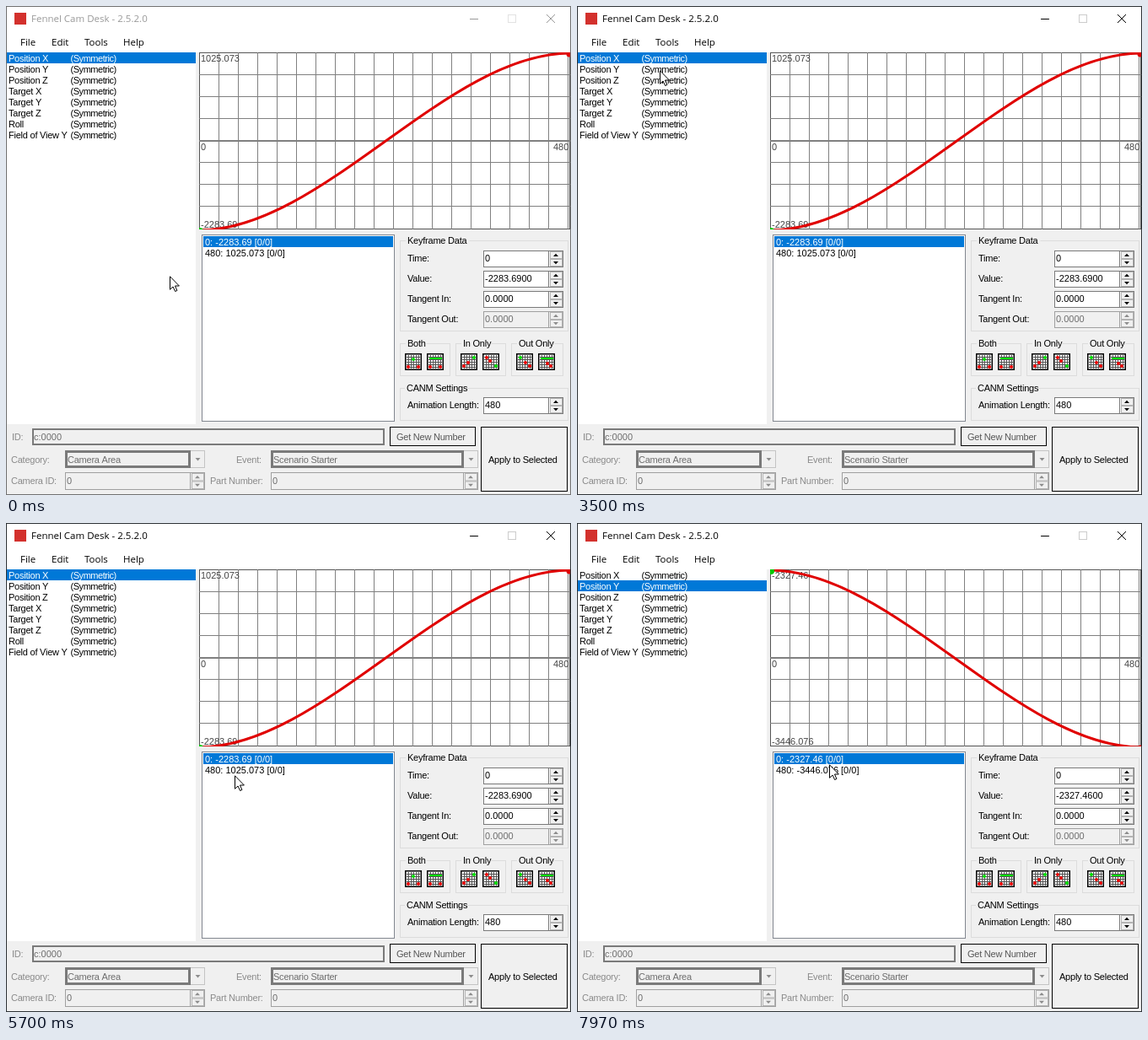
Recreate the animation shown at these times as an HTML page with a canvas. Size 670 by 580 pixels, loop 8000 ms.

```html
<!DOCTYPE html>
<html lang="en">
<head>
<meta charset="utf-8">
<title>Camera curve editor</title>
<style>
html, body { margin: 0; width: 100%; height: 100%; overflow: hidden; background: #f0f0f0; }
canvas { display: block; }
</style>
</head>
<body>
<canvas id="stage" width="670" height="580"></canvas>
<script>
const c = document.getElementById('stage').getContext('2d');
const FACE = '#f0f0f0', BLUE = '#0078d7', DIM = '#6d6d6d', FAINT = '#8a8a8a', GRID = '#808080';
const FORM = '11px "Liberation Sans", Arial, sans-serif';
const MENU = '11.5px "Open Sans", "Noto Sans", sans-serif';
const FPS = 30, FRAMES = 240;
const ROWS = ['Position X', 'Position Y', 'Position Z', 'Target X', 'Target Y', 'Target Z', 'Roll', 'Field of View Y'];
const CURVES = [
  { from: '-2283.69', to: '1025.073', rising: true },
  { from: '-2327.46', to: '-3446.076', rising: false }
];

const smooth = u => u * u * (3 - 2 * u);
const easeIn = u => u * u;
const easeOut = u => u * (2 - u);
const linear = u => u;

// Pointer moves: first frame, last frame, x, y, easing
const START = [194, 320];
const MOVES = [
  [25, 29, 194, 296, easeIn], [29, 50, 89, 72, easeOut],
  [58, 59, 89, 65, linear], [99, 100, 89, 68, linear],
  [103, 120, 316, 275, smooth], [120, 124, 337, 324, easeOut],
  [124, 128, 310, 296, smooth], [128, 133, 278, 279, easeOut],
  [154, 161, 278, 299, smooth], [170, 171, 271, 299, linear],
  [171, 183, 107, 76, smooth], [196, 200, 197, 117, easeIn],
  [200, 211, 281, 278, easeOut], [222, 229, 302, 289, smooth],
  [238, 239, 299, 286, linear]
];

function pointer(frame) {
  let [x, y] = START;
  for (const [a, b, toX, toY, ease] of MOVES) {
    if (frame <= a) break;
    const k = ease(Math.min(1, (frame - a) / (b - a)));
    x += (toX - x) * k;
    y += (toY - y) * k;
  }
  return [Math.round(x), Math.round(y)];
}

function fill(x, y, w, h, color) {
  c.fillStyle = color;
  c.fillRect(x, y, w, h);
}

function box(x, y, w, h, border, inside, thick = 1) {
  fill(x, y, w, h, border);
  fill(x + thick, y + thick, w - 2 * thick, h - 2 * thick, inside);
}

function poly(points, color) {
  c.beginPath();
  points.forEach(p => c.lineTo(...p));
  c.closePath();
  c.fillStyle = color;
  c.fill();
}

function line(x1, y1, x2, y2, color, width = 1) {
  c.beginPath();
  c.moveTo(x1, y1);
  c.lineTo(x2, y2);
  c.strokeStyle = color;
  c.lineWidth = width;
  c.stroke();
}

function dot(x, y, r, color) {
  c.beginPath();
  c.arc(x, y, r, 0, 7);
  c.fillStyle = color;
  c.fill();
}

// y is the middle of the text line; words are set a little tighter than numbers
function text(s, x, y, color = '#000', font = FORM, gap) {
  c.font = font;
  c.letterSpacing = (gap ?? (/[a-z]{2}/i.test(s) ? -0.23 : 0)) + 'px';
  c.fillStyle = color;
  c.fillText(s, x, y + 4);
}

function group(label, x, y, w, h, textX) {
  box(x, y, w, h, '#dcdcdc', FACE);
  c.font = FORM;
  fill(textX - 2, y - 2, c.measureText(label).width + 2, 5, FACE);
  text(label, textX, y);
}

function spinner(value, x, y, w, h, off) {
  const edge = off ? '#a0a0a0' : '#7a7a7a';
  box(x, y, w, h, edge, off ? FACE : '#fff');
  const bx = x + w - 17, half = (h - 2) / 2, color = off ? '#8c8c8c' : '#000';
  line(bx - .5, y, bx - .5, y + h, edge);
  for (const dir of [-1, 1]) {
    const top = y + 1 + (dir > 0 ? half : 0), mid = bx + 8, cy = top + half / 2;
    box(bx + 1, top, 15, half, '#b4b4b4', FACE);
    poly([[mid - 3, cy - dir * 1.5], [mid + 3, cy - dir * 1.5], [mid, cy + dir * 1.8]], color);
  }
  text(value, x + 2, y + h / 2 - 1, off ? DIM : '#000');
}

function combo(value, x, y, w) {
  box(x, y, w, 21, '#c4c4c4', FACE);
  box(x, y, w - 17, 21, '#7a7a7a', FACE, 3);
  const mid = x + w - 8.5;
  poly([[mid - 3, y + 9], [mid + 3, y + 9], [mid, y + 12.5]], '#8c8c8c');
  text(value, x + 3, y + 11, DIM);
}

function button(label, x, y, w, h, textX, color) {
  box(x, y, w, h, '#000', FACE);
  text(label, textX, y + h / 2, color);
}

function presetIcon(x, dots, bar) {
  const y = 412;
  box(x, y, 20, 20, '#000', '#fff', 1.5);
  for (let i = 4; i < 18; i += 3) {
    line(x + i + .5, y + 2, x + i + .5, y + 18, '#555');
    line(x + 2, y + i + .5, x + 18, y + i + .5, '#555');
  }
  if (bar) fill(x + 3, y + 5, 15, 2, '#00e000');
  for (const [dx, dy, green] of dots) dot(x + dx, y + dy, 2, green ? '#00e000' : '#f00000');
}

function titleBar(active) {
  const ink = active ? '#000' : '#999', pale = active ? '#ccc' : '#e2e2e2';
  fill(0, 0, 670, 55, '#fff');
  fill(10, 8, 14, 14, '#d3312d');
  text('Fennel Cam Desk - 2.5.2.0', 30, 15, ink, MENU, 0);
  fill(550, 15, 10, 1, ink);
  box(595, 10, 10, 10, pale, '#fff');
  line(641, 10, 651, 20, ink);
  line(651, 10, 641, 20, ink);
  [['File', 17], ['Edit', 54], ['Tools', 93], ['Help', 139]].forEach(([s, x]) => text(s, x, 43, '#000', MENU, 0));
}

function curveList(selected) {
  fill(1, 55, 224, 441, '#fff');
  fill(1, 55 + 13 * selected, 224, 13, BLUE);
  ROWS.forEach((name, i) => {
    const color = i === selected ? '#fff' : '#000', y = 62 + 13 * i;
    text(name, 3, y, color);
    text('(Symmetric)', 76.5, y, color, FORM, -0.45);
  });
}

function graph({ from, to, rising }) {
  const x0 = 229, x1 = 669, top = 56, bottom = 266;
  const y0 = rising ? bottom : top, y1 = rising ? top : bottom, third = (x1 - x0) / 3;
  box(x0, 55, 440, 210, '#555', '#fff');
  for (let x = x0 + 23; x < x1; x += 23) line(x + .5, 55, x + .5, 265, GRID);
  for (let y = 81; y < 260; y += 26) line(x0, y + .5, x1, y + .5, GRID);
  line(x0, 160.5, x1, 160.5, GRID);
  const ink = '#444';
  text(rising ? to : from, 231, 62, ink);
  text('0', 231, 167, ink);
  text('480', 649, 167, ink);
  text(rising ? from : to, 231, 259, ink);
  c.save();
  c.beginPath();
  c.rect(x0, 55, 440, 210);
  c.clip();
  c.beginPath();
  c.moveTo(x0, y0);
  c.bezierCurveTo(x0 + third, y0, x1 - third, y1, x1, y1);
  c.strokeStyle = '#e00000';
  c.lineWidth = 3;
  c.stroke();
  dot(x0 + 1, y0 + 1, 4, '#00c800');
  dot(x1 - 1, y1 + 1, 3.5, '#e00000');
  c.restore();
}

function keyframes({ from, to }) {
  box(232, 271, 229, 222, '#828790', '#fff');
  fill(234, 273, 225, 13, BLUE);
  text(`0: ${from} [0/0]`, 236, 280, '#fff');
  text(`480: ${to} [0/0]`, 236, 293);

  group('Keyframe Data', 467, 278, 200, 108, 476);
  const fields = [['Time:', '0'], ['Value:', from + '00'], ['Tangent In:', '0.0000'], ['Tangent Out:', '0.0000']];
  fields.forEach(([label, value], i) => {
    text(label, 476, 299 + 24 * i);
    spinner(value, 566, 290 + 24 * i, 95, 20, i === 3);
  });

  group('Both', 467, 400, 60, 39, 476);
  group('In Only', 533, 400, 60, 39, 542);
  group('Out Only', 599, 400, 62, 39, 608);
  presetIcon(473, [[4, 16], [16, 16], [10, 7, true]]);
  presetIcon(499, [[4, 16], [16, 16]], true);
  presetIcon(539, [[4, 15], [9, 11], [16, 5, true]]);
  presetIcon(565, [[5, 5], [9, 9], [16, 15, true]]);
  presetIcon(605, [[5, 5, true], [11, 11], [16, 15]]);
  presetIcon(631, [[11, 12], [15, 15]], true);

  group('CANM Settings', 467, 453, 200, 39, 475);
  text('Animation Length:', 476, 473);
  spinner('480', 566, 464, 95, 20);
}

function footer() {
  text('ID:', 7, 511, FAINT);
  box(31, 501, 418, 20, '#7a7a7a', FACE, 2);
  text('c:0000', 33, 511, DIM);
  button('Get New Number', 455, 499, 102, 23, 463, '#555');
  button('Apply to Selected', 563, 499, 103, 77, 572);
  text('Category:', 6, 538, FAINT);
  combo('Camera Area', 70, 527, 166);
  text('Event:', 273, 538, FAINT);
  combo('Scenario Starter', 314, 527, 246);
  text('Camera ID:', 6, 563, FAINT);
  spinner('0', 70, 553, 166, 21, true);
  text('Part Number:', 242, 563, FAINT);
  spinner('0', 314, 553, 246, 21, true);
}

function arrow(x, y) {
  const shape = [[.5, .8], [.5, 16.3], [4.1, 13], [6.6, 18.5], [8.9, 17.5], [6.5, 12], [11.4, 12]];
  poly(shape.map(([dx, dy]) => [x + dx, y + dy]), '#fff');
  c.strokeStyle = '#000';
  c.lineWidth = 1;
  c.stroke();
}

function draw(frame) {
  const active = frame >= 21, curve = CURVES[frame >= 190 ? 1 : 0];
  fill(0, 0, 670, 580, FACE);
  titleBar(active);
  curveList(frame >= 189 ? 1 : 0);
  graph(curve);
  keyframes(curve);
  footer();
  c.strokeStyle = active ? '#2e3236' : '#707070';
  c.lineWidth = 1;
  c.strokeRect(.5, .5, 669, 579);
  arrow(...pointer(frame));
}

function tick() {
  draw(Math.floor(performance.now() * FPS / 1000 + .01) % FRAMES);
  requestAnimationFrame(tick);
}
tick();
</script>
</body>
</html>
```
